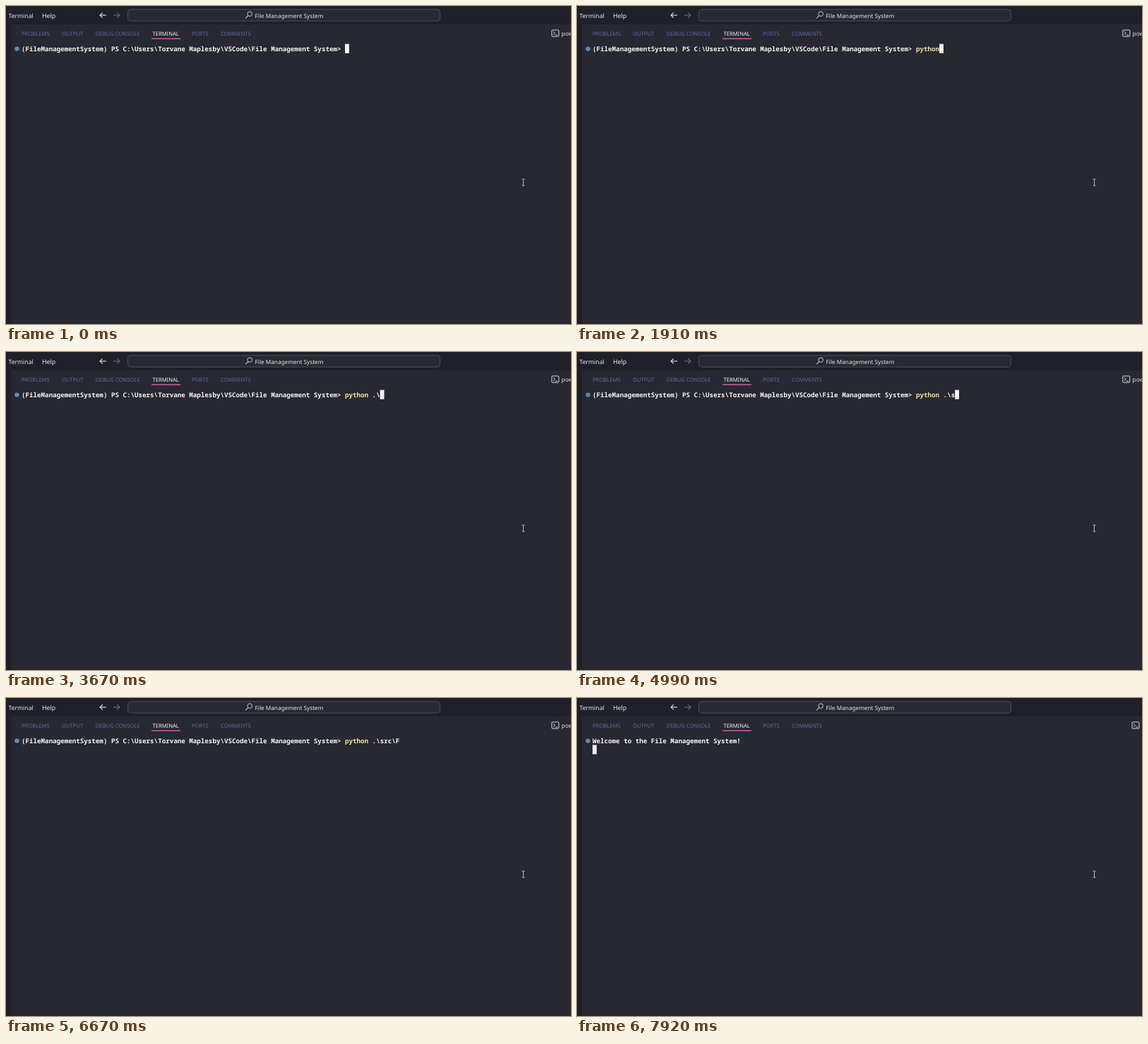
Write an HTML page with a canvas that moves like this. It is 800 by 450 pixels and loops after 7.99 s.

```html
<!DOCTYPE html>
<html lang="en">
<head>
<meta charset="utf-8">
<title>Terminal session</title>
<style>
  html, body { margin: 0; width: 100%; height: 100%; overflow: hidden; background: #282832; }
  canvas { display: block; width: 800px; height: 450px; }
</style>
</head>
<body>
<canvas id="stage"></canvas>
<script>
const LOOP = 7990;
const W = 800, H = 450;
const UI = '"Noto Sans", "Open Sans", sans-serif';
const CELL = 5.518, ROW = 12.7, LEFT = 22, TOP = 54;
const MONO = `600 ${CELL / 0.6}px "Noto Sans Mono", "DejaVu Sans Mono", monospace`;
const WHITE = '#f4f4f0', MUTED = '#6069a0', YELLOW = '#eee29a';

const PROMPT = '(FileManagementSystem) PS C:\\Users\\Torvane Maplesby\\VSCode\\File Management System> ';
const COMMAND = 'python .\\src\\FileManagementSystem.py';

// [time, characters of the command on screen]
const TYPING = [
  [510, 1], [660, 2], [880, 3], [1100, 4], [1250, 5], [1400, 6],
  [1980, 7], [2270, 8], [3370, 9], [4840, 10],
  [5130, 11], [5280, 12], [5430, 13], [6530, 14], [6750, COMMAND.length]
];
const CURSOR_OFF = [6670, 6750];
const ENTER = 7260, RENAME = 7410, GREETING = 7620;

const canvas = document.getElementById('stage');
const ctx = canvas.getContext('2d');
const dpr = window.devicePixelRatio || 1;
canvas.width = W * dpr;
canvas.height = H * dpr;
ctx.textRendering = 'geometricPrecision';

function rect(x, y, w, h, color) {
  ctx.fillStyle = color;
  ctx.fillRect(x, y, w, h);
}

function text(str, x, y, size, color, weight = 400) {
  ctx.font = `${weight} ${size}px ${UI}`;
  ctx.fillStyle = color;
  ctx.fillText(str, x, y);
}

function line(points, color, width = 1) {
  ctx.beginPath();
  points.forEach(([x, y], i) => i ? ctx.lineTo(x, y) : ctx.moveTo(x, y));
  ctx.strokeStyle = color;
  ctx.lineWidth = width;
  ctx.stroke();
}

function ring(x, y, r, color) {
  ctx.beginPath();
  ctx.arc(x, y, r, 0, Math.PI * 2);
  ctx.strokeStyle = color;
  ctx.lineWidth = 1;
  ctx.stroke();
}

function box(x, y, w, h, r, stroke, fill) {
  ctx.beginPath();
  ctx.roundRect(x, y, w, h, r);
  if (fill) {
    ctx.fillStyle = fill;
    ctx.fill();
  }
  ctx.strokeStyle = stroke;
  ctx.lineWidth = 1;
  ctx.stroke();
}

// Terminal text sits on a fixed character grid.
function mono(str, col, row, color) {
  ctx.font = MONO;
  ctx.fillStyle = color;
  [...str].forEach((ch, i) => {
    if (ch !== ' ') ctx.fillText(ch, LEFT + (col + i) * CELL, TOP + 10.4 + row * ROW);
  });
}

function blockCursor(col, row) {
  rect(LEFT + col * CELL, TOP - 0.3 + row * ROW, CELL + 0.3, 13.1, WHITE);
}

function arrow(tail, tip, color) {
  const back = tip + Math.sign(tail - tip) * 3.8;
  line([[tail, 13], [tip, 13]], color, 1.1);
  line([[back, 9.3], [tip, 13], [back, 16.7]], color, 1.1);
}

function titleBar() {
  rect(0, 0, W, 26, '#20202a');
  rect(0, 26, 7.5, H - 26, '#20202a');
  text('Terminal', 3.5, 16.5, 8.6, '#e8e8e8');
  text('Help', 51, 16.5, 8.9, '#e8e8e8');
  arrow(142, 133, '#e4e4e6');
  arrow(152, 161, '#6d6d78');
  box(172.5, 4.8, 442, 16.4, 4, '#4b4b57', '#292933');
  ring(345.2, 11.2, 3.3, '#c4c4c8');
  line([[342.8, 13.6], [339.2, 17.4]], '#c4c4c8', 1.1);
  text('File Management System', 352.6, 16.6, 8.2, '#e6e6e8');
}

function tabs() {
  const items = [
    ['PROBLEMS', 22], ['OUTPUT', 79], ['DEBUG CONSOLE', 126.8],
    ['TERMINAL', 207.4], ['PORTS', 263], ['COMMENTS', 304]
  ];
  for (const [name, x] of items) {
    text(name, x, 41.8, 7.65, name === 'TERMINAL' ? WHITE : MUTED);
  }
  rect(206, 45.6, 41, 1.4, '#d55fa6');
}

function shellLabel(renamed) {
  const x = renamed ? 786 : 772.8;
  const color = '#d4d4d8';
  box(x, 34, 10, 9.2, 1, color);
  line([[x + 2, 36.2], [x + 4.6, 38.6], [x + 2, 41]], color);
  line([[x + 5, 41.2], [x + 8.4, 41.2]], color);
  if (!renamed) text('powershell', 786.6, 41.8, 8.2, '#e6e6e8');
}

function pointer() {
  const color = '#b9b9bf';
  line([[732.5, 245.5], [732.5, 253.5]], color);
  for (const y of [245, 254]) line([[730.5, y], [734.5, y]], color);
}

function session(t) {
  ctx.beginPath();
  ctx.arc(15.5, 60.6, 3.2, 0, Math.PI * 2);
  ctx.fillStyle = '#6289ae';
  ctx.fill();

  if (t >= GREETING) {
    mono('Welcome to the File Management System!', 0, 0, WHITE);
    blockCursor(0, 1);
    return;
  }
  const typed = TYPING.reduce((n, [at, count]) => t >= at ? count : n, 0);
  const start = PROMPT.length;
  mono(PROMPT, 0, 0, WHITE);
  mono(COMMAND.slice(0, Math.min(typed, 6)), start, 0, YELLOW);
  mono(COMMAND.slice(6, Math.max(typed, 6)), start + 6, 0, WHITE);
  if (t >= ENTER) blockCursor(0, 1);
  else if (t < CURSOR_OFF[0] || t >= CURSOR_OFF[1]) blockCursor(start + typed, 0);
}

function draw(now) {
  const t = now % LOOP;
  ctx.setTransform(dpr, 0, 0, dpr, 0, 0);
  rect(0, 0, W, H, '#282832');
  titleBar();
  tabs();
  shellLabel(t >= RENAME);
  session(t);
  pointer();
}

let begin;
function tick(now) {
  begin ??= now;
  draw(Math.max(0, now - begin));
  requestAnimationFrame(tick);
}
requestAnimationFrame(tick);
</script>
</body>
</html>
```
